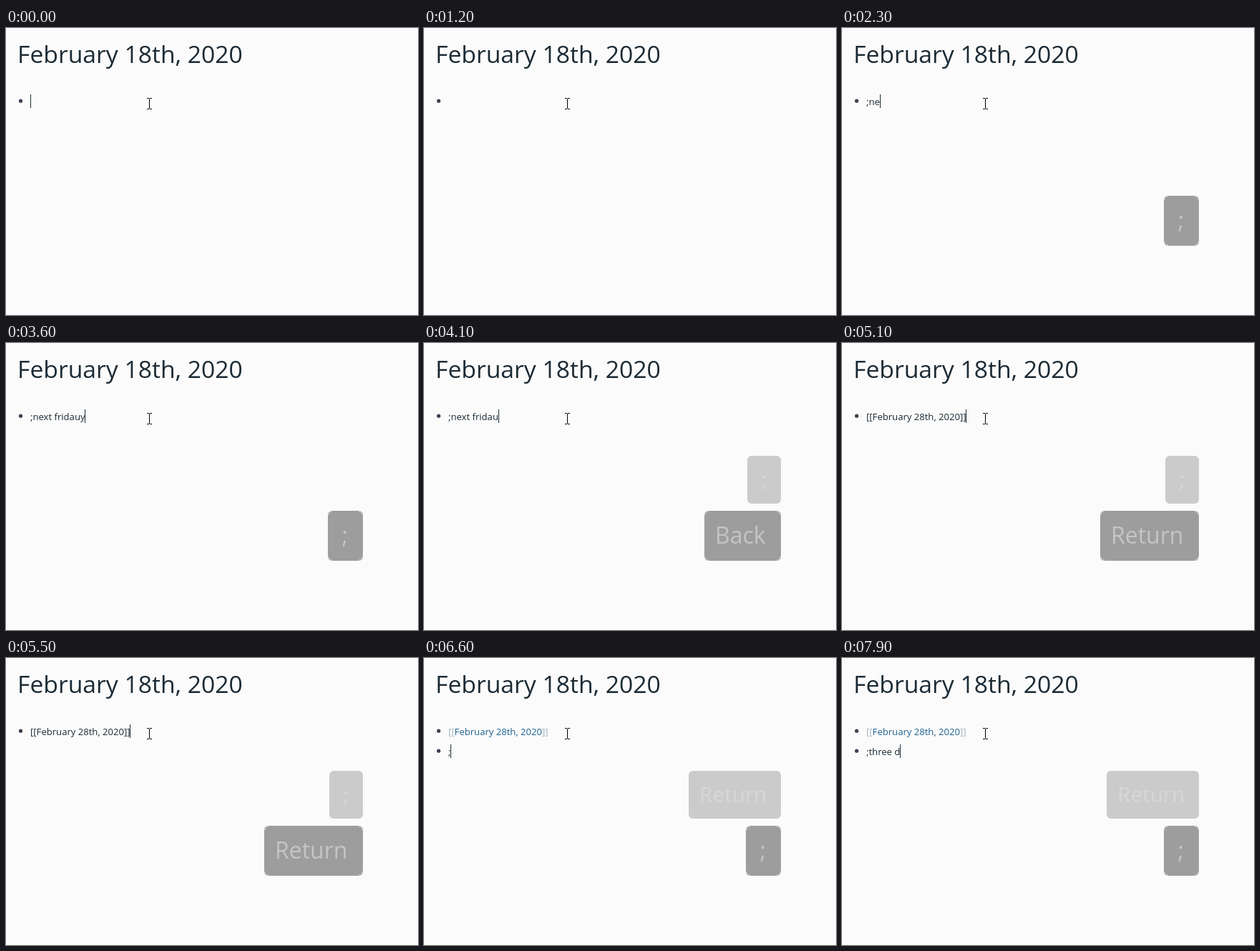
Animation, 576 px wide and 402 px high, one loop 8000 ms. Source, as an HTML page with a canvas:

```html
<!DOCTYPE html>
<html lang="en">
<head>
<meta charset="utf-8">
<title>Daily notes</title>
<style>
  html, body { margin: 0; width: 100%; height: 100%; overflow: hidden; background: #fbfbfb; }
  canvas { display: block; }
</style>
</head>
<body>
<canvas id="stage" width="576" height="402"></canvas>
<script>
const ctx = document.getElementById('stage').getContext('2d');
const LOOP = 8000;
const FAMILY = '"Open Sans", "Noto Sans", sans-serif';
const INK = '#1c2b35';
const DATE = 'February 28th, 2020';

// [start ms, text being edited]
const typing = [
  [0, ''], [1800, ';'], [2200, ';n'], [2300, ';ne'], [2500, ';nex'],
  [2600, ';next'], [2700, ';next '], [2900, ';next f'], [3100, ';next fr'],
  [3200, ';next fri'], [3300, ';next frid'], [3500, ';next frida'],
  [3600, ';next fridauy'], [4100, ';next fridau'], [4200, ';next frida'],
  [4700, ';next friday'], [5100, `[[${DATE}]]`], [5600, ''], [6600, ';'],
  [7000, ';th'], [7100, ';thr'], [7300, ';thre'], [7400, ';three'],
  [7700, ';three '], [7900, ';three d']
];
const NEW_LINE = 5600;

// [start ms, lower key, upper key]
const presses = [
  [0], [1800, ';'], [4100, 'Back', ';'], [4200, 'Back x 2', ';'],
  [5000, 'Return', ';'], [6600, ';', 'Return']
];

const caretOff = [[100, 700], [1200, 1800], [6100, 6600]];

// left edges of the key caps
const lowerKey = { y: 235, h: 70, size: 32, base: 281, fill: '#9d9d9d', ink: '#c5c5c5',
  left: { ';': 450, 'Back': 392, 'Back x 2': 334, 'Return': 361 } };
const upperKey = { y: 158, h: 67, size: 29.8, base: 202, fill: '#cbcbcb', ink: '#d7d7d7',
  left: { ';': 452, 'Return': 370 } };
const KEY_RIGHT = 499;

const at = (list, t) => list.filter(e => e[0] <= t).pop();

function text(str, x, y, size, color) {
  ctx.font = `${size}px ${FAMILY}`;
  ctx.fillStyle = color;
  ctx.fillText(str, x, y);
  return x + ctx.measureText(str).width;
}

function bullet(y) {
  ctx.fillStyle = '#3f3f52';
  ctx.beginPath();
  ctx.arc(20.5, y, 2.6, 0, Math.PI * 2);
  ctx.fill();
}

function pointer() {
  ctx.fillStyle = '#000';
  for (const y of [98, 113]) {
    ctx.fillRect(197, y, 3, 1);
    ctx.fillRect(201, y, 3, 1);
  }
  ctx.fillRect(200, 99, 1, 14);
}

function glints(x, y, w, h) {
  const r = 5, i = 6;
  ctx.strokeStyle = '#e6e6e6';
  ctx.lineWidth = 1;
  ctx.setLineDash([2, 1]);
  [[x + i, y + i, 2], [x + w - i, y + i, 3], [x + w - i, y + h - i, 0], [x + i, y + h - i, 1]]
    .forEach(([cx, cy, q]) => {
      ctx.beginPath();
      ctx.arc(cx, cy, r, q * Math.PI / 2, (q + 1) * Math.PI / 2);
      ctx.stroke();
    });
  ctx.setLineDash([]);
}

function key(label, k) {
  if (!label) return;
  const x = k.left[label], w = KEY_RIGHT - x;
  ctx.fillStyle = k.fill;
  ctx.beginPath();
  ctx.roundRect(x, k.y, w, k.h, 6);
  ctx.fill();
  if (k === lowerKey) glints(x, k.y, w, k.h);
  text(label, x + (label === ';' ? 19.5 : 15), k.base, k.size, k.ink);
}

function draw(t) {
  ctx.fillStyle = '#fbfbfb';
  ctx.fillRect(0, 0, 576, 402);
  text('February 18th, 2020', 16, 49, 33.7, INK);

  const second = t >= NEW_LINE;
  const drop = second ? 28 : 0;
  bullet(102.2);
  if (second) {
    bullet(130.2);
    let x = text('[[', 34, 108, 13.1, '#a3b3bf');
    x = text(DATE, x, 108, 13.1, '#20628f');
    text(']]', x, 108, 13.1, '#a3b3bf');
  }
  const end = text(at(typing, t)[1], 34, 108 + drop, 13.1, INK);
  if (!caretOff.some(([a, b]) => t >= a && t < b)) {
    ctx.fillStyle = INK;
    ctx.fillRect(Math.floor(end + 0.2), 93 + drop, 1, 19);
  }

  const [, lower, upper] = at(presses, t);
  key(upper, upperKey);
  key(lower, lowerKey);
  pointer();
}

const start = performance.now();
function tick() {
  draw((performance.now() - start) % LOOP);
  requestAnimationFrame(tick);
}
tick();
</script>
</body>
</html>
```
